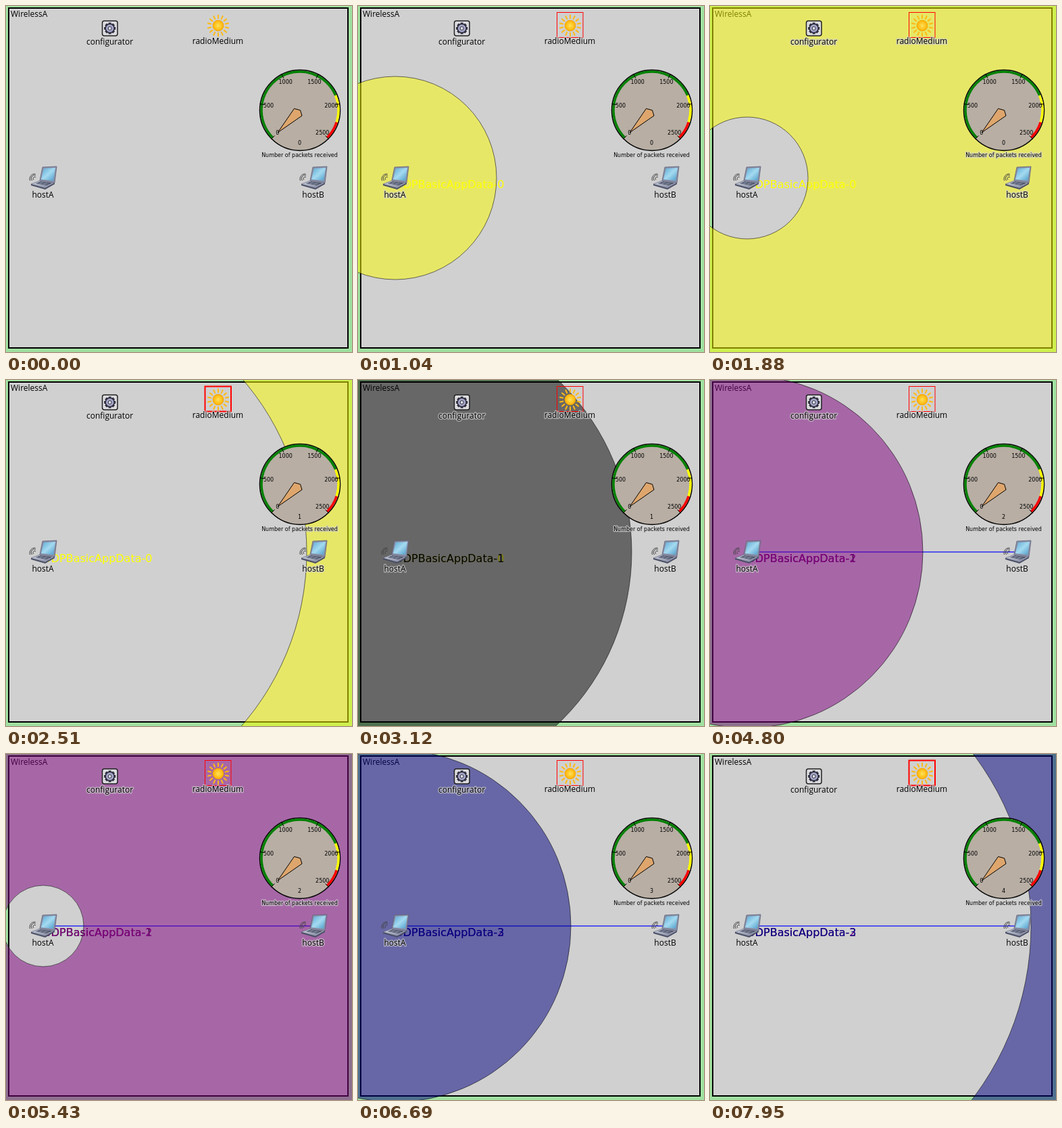
Recreate the animation shown at these times as an HTML page. Size 512x511 px, loop 8000 ms.

```html
<!DOCTYPE html>
<html lang="en">
<head>
<meta charset="utf-8">
<title>Wireless signal propagation</title>
<style>
  html, body { margin: 0; width: 100%; height: 100%; overflow: hidden; background: #a0e0a0; }
  svg { display: block; width: 512px; height: 511px; }
  .name { font: 12px "Open Sans", sans-serif; text-anchor: middle; }
  .halo { stroke: #d0d0d0; stroke-opacity: .65; stroke-width: 3px; stroke-linejoin: round; paint-order: stroke; }
  .packet { font: 16px "DejaVu Sans", sans-serif; }
  .dial { font: 8px "DejaVu Sans", sans-serif; text-anchor: middle; }
</style>
</head>
<body>
<svg viewBox="0 0 512 511">
  <defs>
    <linearGradient id="screen" x2="1" y2="1">
      <stop offset="0" stop-color="#5aa8d4"/>
      <stop offset=".5" stop-color="#a4daf0"/>
      <stop offset="1" stop-color="#4a9ac8"/>
    </linearGradient>
    <linearGradient id="base" x2="1" y2="1">
      <stop offset="0" stop-color="#d4d8e4"/>
      <stop offset="1" stop-color="#767c94"/>
    </linearGradient>
    <radialGradient id="sunFill">
      <stop offset="0" stop-color="#ffe25a"/>
      <stop offset="1" stop-color="#ffb000"/>
    </radialGradient>
    <!-- Laptop with antenna arcs, centred on the host position -->
    <g id="host">
      <path d="M-1-16 20-17 17 7-5 4Z" fill="#8a90a8" stroke="#5c6278" stroke-width=".8"/>
      <path d="M1-14 18-15 15 4-3 2Z" fill="url(#screen)"/>
      <path d="M-18 9-5 4 17 7 3 15Z" fill="url(#base)" stroke="#666c84" stroke-width=".7"/>
      <path d="M-18 9 3 15 17 7v2L3 17-18 11Z" fill="#4a4f66"/>
      <path d="M-11 8-4 5 13 7.500 5 11Z" fill="#454a60"/>
      <path d="M-9 7.500 6 10M-6 6 9 9M-6 9 0 5.500M0 10 6 6.500" stroke="#9da3b8" stroke-width=".6"/>
      <path d="M-14 3a2.500 2.500 0 0 1 3-4M-16.500 4a5 5 0 0 1 5.500-8M-19.500 4a7.500 7.500 0 0 1 8-10"
            fill="none" stroke="#444" stroke-width="1"/>
    </g>
  </defs>

  <rect width="512" height="511" fill="#a0e0a0"/>
  <rect x="4" y="3" width="502" height="502" fill="#d0d0d0" stroke="#000" stroke-width="2"/>
  <text class="name" x="7" y="16" style="text-anchor:start">WirelessA</text>

  <text class="packet" id="oldLabel" x="55" y="269"></text>
  <text class="packet" id="label" x="55" y="269"></text>
  <g id="link" opacity=".8">
    <path d="M55 254H452" stroke="#00f" stroke-width="1.500"/>
    <path d="M451 251 457 254 451 257Z" fill="#00f"/>
  </g>

  <path id="wave" fill-opacity=".5" fill-rule="evenodd"/>
  <circle id="edge" cx="55" cy="254" fill="none" stroke="#000" stroke-opacity=".55"/>

  <use href="#host" x="55" y="254"/>
  <use href="#host" x="455" y="254"/>

  <rect x="142.500" y="22" width="22.500" height="22" rx="3" fill="#dcdce0" stroke="#222" stroke-width="1.500"/>
  <g transform="translate(153.700 33)">
    <g id="teeth" stroke="#2c2c3c" stroke-width="4"></g>
    <circle r="6.500" fill="#a6a6c8" stroke="#2c2c3c" stroke-width="1.500"/>
    <circle r="2.500" fill="#e4e4ee" stroke="#2c2c3c"/>
  </g>
  <g transform="translate(314 29)">
    <g id="rays" stroke="#ffba14" stroke-width="2" stroke-linecap="round"></g>
    <circle r="8" fill="url(#sunFill)" stroke="#f0a000" stroke-width=".7"/>
  </g>
  <rect id="focus" fill="none" stroke="#f00"/>

  <g class="name halo">
    <text x="153.500" y="57">configurator</text>
    <text x="313.500" y="56">radioMedium</text>
    <text x="54.500" y="283">hostA</text>
    <text x="454.500" y="283">hostB</text>
  </g>

  <g class="dial">
    <circle cx="435" cy="154" r="59.500" fill="#b8aea4" stroke="#000" stroke-width="1.500"/>
    <g id="scale"></g>
    <path d="M402 187 426.500 151.500 435.500 154 438 162Z" fill="#dea66c" stroke="#000"/>
    <text id="count" x="434.500" y="205"></text>
    <text class="halo" x="434.500" y="223">Number of packets received</text>
  </g>
</svg>
<script>
const $ = id => document.getElementById(id);
const set = (el, attrs) => { for (const k in attrs) el.setAttribute(k, attrs[k]); };

const spokes = (n, r1, r2) => Array.from({ length: n }, (_, i) =>
  `<path d="M0 ${-r1}V${-r2}" transform="rotate(${i * 360 / n})"/>`).join('');
$('teeth').innerHTML = spokes(8, 6, 8.5);
$('rays').innerHTML = spokes(14, 11, 15.5);

// Gauge: fraction 0..1 runs clockwise over 270 degrees from lower left
const polar = (f, r) => {
  const a = (135 + 270 * f) * Math.PI / 180;
  return [435 + r * Math.cos(a), 154 + r * Math.sin(a)];
};
const arc = (from, to, color) =>
  `<path d="M${polar(from, 57)}A57 57 0 ${to - from > 2 / 3 ? 1 : 0} 1 ${polar(to, 57)}" fill="none" stroke="${color}" stroke-width="3.5"/>`;
let scale = arc(0, .75, '#008000') + arc(.75, .9, '#ff0') + arc(.9, 1, '#f00');
for (let i = 0; i <= 5; i++) {
  const [x, y] = polar(i / 5, 47);
  scale += `<path d="M${polar(i / 5, 60)}L${polar(i / 5, 53)}" stroke="#000"/>
    <text x="${x}" y="${y + 3}">${i * 500}</text>`;
}
$('scale').innerHTML = scale;

// Per transmission: step and radius where the front and the tail begin, step of arrival
const LOOP = 8000, SPEED = 100;
const waves = [
  { color: '#ff0',    front: 4,  r: 150, tail: 7,  hole: -10, done: 11 },
  { color: '#000',    front: 12, r: 150, tail: 15, hole: 0,   done: 19 },
  { color: '#800080', front: 20, r: 60,  tail: 24, hole: -40, done: 29 },
  { color: '#000080', front: 30, r: 160, tail: 33, hole: 20,  done: 37 },
];

const startOf = n => n < 1 ? 0 : 420 + 210 * (n - 1) - 10 * ((n >= 4) + (n >= 12) + (n >= 14));
const disc = r => `M${55 - r} 254a${r} ${r} 0 1 0 ${2 * r} 0a${r} ${r} 0 1 0 ${-2 * r} 0Z`;

function setLabel(el, i) {
  el.textContent = i < 0 ? '' : 'UDPBasicAppData-' + i;
  if (i >= 0) el.setAttribute('fill', waves[i].color);
}

function setFocus(n, arrived) {
  const box = n < 1 ? [0, 0, 0, 0]
    : n < 4 ? [n < 2 ? 33 : 433, 235, 44, 38]
    : [294.5, 9.5, 38.5, 37];
  set($('focus'), {
    x: box[0], y: box[1], width: box[2], height: box[3],
    'stroke-width': n < 4 || arrived ? 2 : 1,
    visibility: n < 1 ? 'hidden' : 'visible',
  });
}

function draw(n) {
  const i = waves.filter(w => n >= w.front).length - 1;
  const w = waves[i];
  let r = 0, path = '';
  if (w) {
    const tail = n >= w.tail;
    r = tail ? w.hole + SPEED * (n - w.tail) : w.r + SPEED * (n - w.front);
    r = Math.max(0, Math.min(420, r));
    path = (tail ? 'M0 0H512V511H0Z' : '') + (r ? disc(r) : '');
  }
  set($('wave'), { d: path, fill: w ? w.color : 'none' });
  set($('edge'), { r, visibility: r ? 'visible' : 'hidden' });
  setLabel($('oldLabel'), i - 1);
  setLabel($('label'), i);
  setFocus(n, w && n === w.done);
  $('count').textContent = waves.filter(v => n >= v.done).length;
  $('link').setAttribute('visibility', n >= 19 ? 'visible' : 'hidden');
}

let shown = -1;
const began = performance.now();
function tick() {
  const t = (performance.now() - began) % LOOP;
  let n = 0;
  while (n < 37 && t >= startOf(n + 1)) n++;
  if (n !== shown) draw(shown = n);
  requestAnimationFrame(tick);
}
tick();
</script>
</body>
</html>
```
